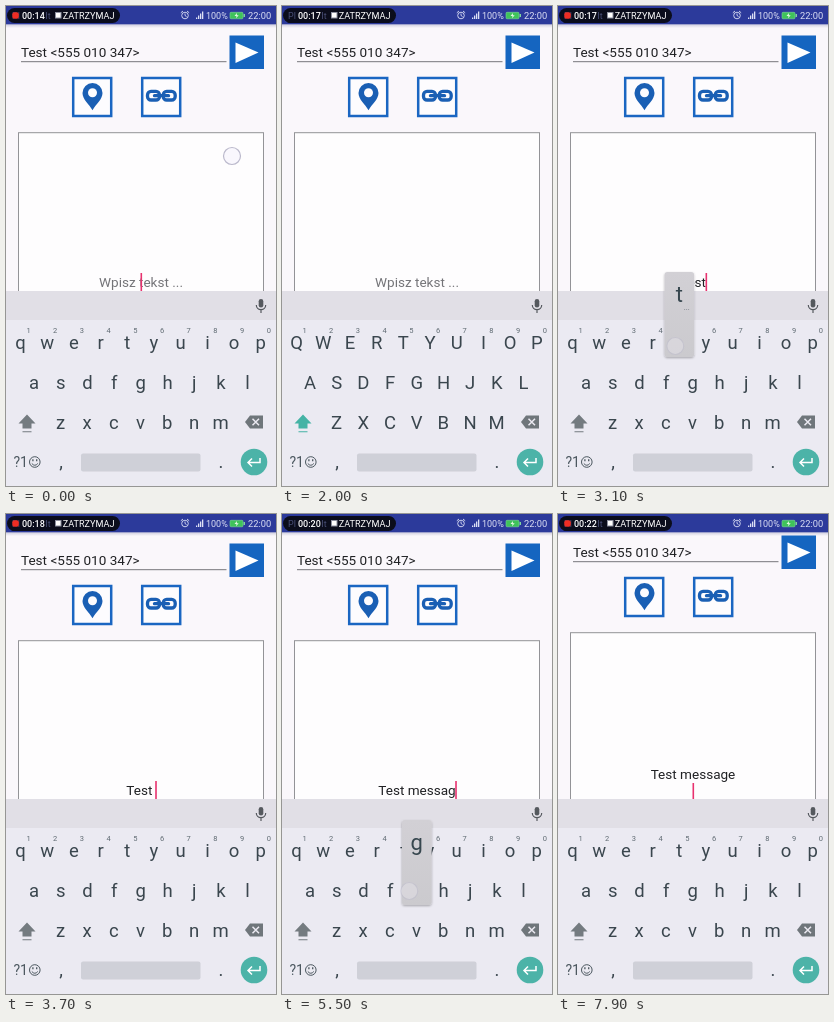
An HTML page for the animation above (8000 ms loop, 270 by 480 pixels).

```html
<!DOCTYPE html>
<html lang="pl">
<head>
<meta charset="utf-8">
<title>Test message</title>
<style>
  html, body { margin: 0; width: 100%; height: 100%; overflow: hidden; background: #faf7fb; }
  svg { display: block; width: 100vw; height: 100vh; font-family: Roboto, "Noto Sans", sans-serif; }
  text { white-space: pre; }
  .mid { text-anchor: middle; }
  .body { font-size: 13.55px; fill: #202124; }
  .key { font-size: 18.5px; fill: #3a464e; }
  .num { font-size: 7.5px; fill: #5f6a72; }
  .big { font-size: 22px; fill: #37474f; }
  .status { fill: #dde0f5; }
  .under { font-size: 9px; fill: #4a5078; }
</style>
</head>
<body>
<svg viewBox="0 0 270 480" preserveAspectRatio="none">
  <defs>
    <clipPath id="view"><rect y="18" width="270" height="267"/></clipPath>
    <linearGradient id="shade" x2="0" y2="1">
      <stop stop-color="#d2d0d5"/><stop offset="1" stop-color="#cbcace"/>
    </linearGradient>
    <linearGradient id="edge" x2="0" y2="1">
      <stop stop-color="#cbcadd"/><stop offset="1" stop-color="#faf7fb"/>
    </linearGradient>
    <filter id="soft" x="-20%" y="-10%" width="140%" height="125%">
      <feDropShadow dx="0" dy="1" stdDeviation="1" flood-opacity=".3"/>
    </filter>
  </defs>
  <rect width="270" height="480" fill="#faf7fb"/>
  <rect y="18" width="270" height="4" fill="url(#edge)"/>

  <g clip-path="url(#view)">
    <g id="page">
      <text class="body" x="15" y="51.200" font-size="13.400">Test &lt;555 010 347&gt;</text>
      <path d="M15 55.700H220.500" stroke="#77777c"/>
      <rect x="223.500" y="29.500" width="34.500" height="33.500" fill="#1565c0"/>
      <path d="M229.500 36.500L252.500 46.500L229.500 57Z" fill="#fff"/>
      <g fill="#fdfcfe" stroke="#1a66c2" stroke-width="2.500">
        <rect x="67.200" y="72" width="38" height="38"/>
        <rect x="136.200" y="72" width="38" height="38"/>
      </g>
      <path d="M86.500 104.300C83 98 76.500 93.500 76.500 87A10 10 0 0 1 96.500 87C96.500 93.500 90 98 86.500 104.300Z" fill="#1a5fb4"/>
      <circle cx="86.500" cy="86.800" r="4.500" fill="#fdfcfe"/>
      <g fill="none" stroke="#1a5fb4" stroke-width="3.300">
        <rect x="141.500" y="85.400" width="12" height="8.600" rx="3.500"/>
        <rect x="157.200" y="85.400" width="12" height="8.600" rx="3.500"/>
        <path d="M148.500 89.700H162.500" stroke-linecap="round"/>
      </g>
      <rect x="12.500" y="126.700" width="245" height="220" fill="#fefdfe" stroke="#939397"/>
    </g>
    <text id="msg" class="body mid" x="135" y="281"></text>
    <rect id="caret" width="1.600" height="18" fill="#e8326f"/>
  </g>

  <rect width="270" height="18.300" fill="#2c3a9b"/>
  <rect x="1" y="2" width="113" height="15" rx="7.500" fill="#0b0d1c"/>
  <text class="under" x="6" y="12.800">Pl</text>
  <text class="under" x="39.500" y="12.800">lt</text>
  <rect id="dot" x="6.300" y="6.200" width="6.500" height="6.500" rx="2" fill="#ee2d24"/>
  <text id="clock" x="16" y="12.800" font-size="9" font-weight="500" fill="#fff"></text>
  <rect x="49.500" y="6.500" width="5.500" height="5.500" fill="#fff" stroke="#8d90a0"/>
  <text x="56.700" y="12.800" font-size="9.100" fill="#fff">ZATRZYMAJ</text>
  <g fill="none" stroke="#dde0f5" stroke-width=".9">
    <circle cx="179" cy="9.500" r="3.300"/>
    <path d="M179 7.500V9.500L180.500 10.500M174.800 6.800L177 5M183.200 6.800L181 5"/>
  </g>
  <path d="M190 13V11.500H191.300V13ZM192 13V9.500H193.300V13ZM194 13V7.500H195.300V13ZM196 13V5.500H197.300V13Z" fill="#dde0f5"/>
  <text class="status" x="200" y="12.800" font-size="9">100%</text>
  <rect x="224" y="6.300" width="13" height="6.500" rx="1" fill="#3fc35a" stroke="#7fd69a" stroke-width=".6"/>
  <rect x="237.500" y="8" width="1.500" height="3" fill="#7fd69a"/>
  <path d="M231 7L228.500 10H230.500L230 12.200L232.700 9.200H230.800Z" fill="#e8f8e8"/>
  <text class="status" x="242" y="12.800" font-size="9.300">22:00</text>

  <rect y="285" width="270" height="30" fill="#e1dfe6"/>
  <rect y="314" width="270" height="166" fill="#ebeaf2"/>
  <rect x="252.700" y="293" width="4.600" height="8.500" rx="2.300" fill="#55595e"/>
  <path d="M250.300 299A4.700 4.700 0 0 0 259.700 299M255 303.700V307" fill="none" stroke="#55595e" stroke-width="1.200"/>
  <g id="keys"></g>
  <path id="shift" d="M21 408.500L29.500 417.500H25.500V422.500H16.500V417.500H12.500ZM16.500 425.200H25.500V426.200H16.500Z"/>
  <path d="M244 409.500H257V422.500H244L239 416Z" fill="#6f767b"/>
  <path d="M246.500 412.800L253 419.200M253 412.800L246.500 419.200" stroke="#ebeaf2" stroke-width="1.500"/>
  <text x="7.500" y="461" font-size="14" fill="#4b575f">?1</text>
  <g fill="none" stroke="#4b575f">
    <circle cx="28.800" cy="456" r="5.300"/>
    <path d="M25.800 457.500Q28.800 461 31.800 457.500"/>
    <path d="M26.900 453.300V455.300M30.700 453.300V455.300" stroke-width="1.300"/>
  </g>
  <text class="key mid" x="55" y="462">,</text>
  <rect id="space" x="75" y="447.500" width="119.500" height="18" rx="2"/>
  <text class="key mid" x="215" y="462">.</text>
  <circle id="enter" cx="248" cy="456" r="13.300"/>
  <path d="M254 452V456.500H242.500M246 452.500L242 456.500L246 460.500" fill="none" stroke="#fff" stroke-width="1.500"/>
  <g id="popups"></g>
  <g id="touches"></g>
</svg>
<script>
const LOOP = 8000;
const $ = id => document.getElementById(id);
const NS = "http://www.w3.org/2000/svg";
const add = (parent, tag, attrs, text = "") => {
  const el = document.createElementNS(NS, tag);
  for (const k in attrs) el.setAttribute(k, attrs[k]);
  el.textContent = text;
  parent.append(el);
  return el;
};
const show = (el, on) => el.setAttribute("visibility", on ? "visible" : "hidden");
const within = (t, spans) => spans.some(([a, b]) => t >= a && t < b);

// Keyboard: letters, first centre, baseline, popup top
const rows = [["qwertyuiop", 14.5, 343, 266], ["asdfghjkl", 28, 383, 306], ["zxcvbnm", 54.5, 423, 350]];
const keys = {};
rows.forEach(([letters, x0, y, top], row) => [...letters].forEach((ch, i) => {
  const x = x0 + i * 26.7;
  keys[ch] = { x, y, top, el: add($("keys"), "text", { class: "key mid", x, y }, ch) };
  if (!row) add($("keys"), "text", { class: "num mid", x: x + 8, y: 327 }, (i + 1) % 10);
}));

// Strokes: character, press, commit, popup end, finger offset from key centre
const strokes = [
  ["T", 2100, 2200, 2300, -3, 2], ["e", 2400, 2500, 2600, -1, 5],
  ["s", 2700, 2800, 2900, 2, 2], ["t", 3000, 3100, 3200, -4, 3],
  [" ", 3400, 3500, 3600, 0, 0], ["m", 4300, 4480, 4600, -3, -3],
  ["e", 4480, 4600, 4700, -1.5, 6.5], ["s", 4700, 4800, 4870, 1, 1],
  ["s", 4920, 5000, 5100, 1, 1], ["a", 5180, 5280, 5380, 2, 2],
  ["g", 5400, 5500, 5600, -7.5, 0], ["e", 5620, 5700, 5900, -1, 6]
];

const touches = [];
const touch = (x, y, from, up, to) => {
  const el = add($("touches"), "circle", {
    cx: x, cy: y, r: 8.5, fill: "#f6f4fc", "fill-opacity": .7, stroke: "#bbb9cc", "stroke-width": 1.2
  });
  touches.push({ el, from, up, to });
};
touch(226, 150, 0, 200, 300);
touch(21, 417, 1400, 1550, 1650);
touch(255, 460, 6650, 7300, 7500);

const popups = [];
for (const [ch, from, up, to, dx, dy] of strokes) {
  if (ch === " ") {
    touch(150, 462, from, up, to);
    continue;
  }
  const { x, y, top } = keys[ch.toLowerCase()];
  const g = add($("popups"), "g", {});
  add(g, "rect", { x: x - 14.8, y: top, width: 29.6, height: 85, rx: 3, fill: "url(#shade)", filter: "url(#soft)" });
  add(g, "text", { class: "big mid", x, y: top + 29.5 }, ch);
  if ("tesa".includes(ch.toLowerCase()))
    add(g, "text", { class: "num mid", x: x + 7.5, y: top + 37.5 }, "...");
  popups.push({ el: g, from, to });
  touch(x + dx, y - 6 + dy, from, up, to);
}

const dotOn = [[0, 400], [950, 1500], [2500, 3250], [3650, 4050], [4700, 5200], [5950, 6450], [6700, 7150], [7500, LOOP]];
const caretOff = [[450, 950], [1450, 2200], [4000, 4480], [6000, 6450], [7300, 7900]];
const ticks = [200, 1000, 2000, 3250, 4200, 5300, 6700, 7900];
const count = (list, t) => list.filter(x => x <= t).length;

function draw(t) {
  const text = strokes.filter(s => s[2] <= t).map(s => s[0]).join("");
  const newline = t >= 6700;
  const k = Math.min(1, Math.max(0, (t - 6900) / 300));
  const scroll = -8 * (1 - (1 - k) ** 2);

  $("page").setAttribute("transform", `translate(0 ${scroll})`);
  const msg = $("msg");
  msg.textContent = text || "Wpisz tekst ...";
  msg.style.fill = text ? "#202124" : "#747478";
  msg.setAttribute("y", newline ? 273.3 + scroll : 281);
  const caret = $("caret");
  caret.setAttribute("x", 134.5 + (text && !newline ? msg.getComputedTextLength() / 2 : 0));
  caret.setAttribute("y", newline ? 277 + scroll : 267);
  show(caret, !within(t, caretOff));

  const caps = t >= 1600 && t < 2300;
  for (const ch in keys) keys[ch].el.textContent = caps ? ch.toUpperCase() : ch;
  $("shift").setAttribute("fill", caps ? "#45b3a5" : "#747b80");
  $("space").setAttribute("fill", t >= 3400 && t < 3600 ? "#bfc1c9" : "#cfd0d8");
  $("enter").setAttribute("fill", t >= 6650 && t < 7300 ? "#43a89c" : "#4cb3a8");

  show($("dot"), within(t, dotOn));
  $("clock").textContent = "00:" + (14 + count(ticks, t));

  for (const p of popups) show(p.el, t >= p.from && t < p.to);
  for (const p of touches) {
    show(p.el, t >= p.from && t < p.to);
    p.el.setAttribute("opacity", t < p.up ? 1 : .4);
  }
}

const start = performance.now();
function loop() {
  draw((performance.now() - start) % LOOP);
  requestAnimationFrame(loop);
}
loop();
</script>
</body>
</html>
```
